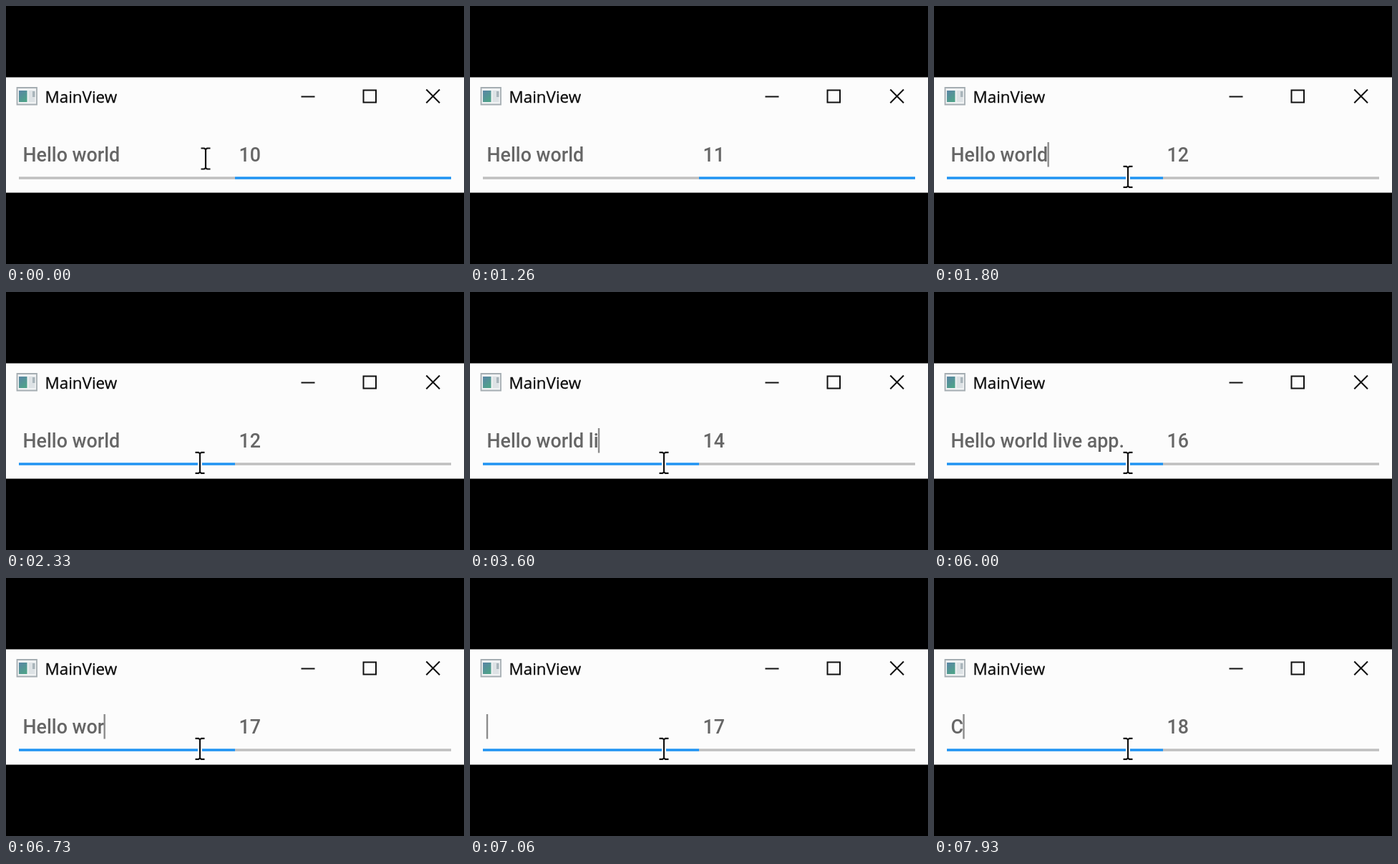
An HTML page for the animation above (8 s loop, 640 by 360 pixels).

```html
<!DOCTYPE html>
<html lang="en">
<head>
<meta charset="utf-8">
<title>MainView</title>
<style>
  html, body { margin: 0; width: 100%; height: 100%; overflow: hidden; background: #000; }
  svg { display: block; width: 100vw; height: 100vh; }
  text { white-space: pre; }
  .soft { filter: blur(.5px); }
  .title { font: 22.4px "Open Sans", "Noto Sans", sans-serif; fill: #0c0c0c; stroke: #0c0c0c; stroke-width: .3; }
  .field { font: 500 26.8px Roboto, sans-serif; fill: #666; }
  .line { stroke: #bfbfbf; stroke-width: 3.6; }
  .line.focus { stroke: #1f93f2; }
  .buttons { fill: none; stroke: #111; stroke-width: 2; }
</style>
</head>
<body>
<svg viewBox="0 0 640 360">
  <defs>
    <clipPath id="frame"><path d="M0 99.5H640V260.5H0z"/></clipPath>
    <linearGradient id="teal" x2="0.6" y2="1">
      <stop stop-color="#5a84a6"/><stop offset="1" stop-color="#4fa28a"/>
    </linearGradient>
    <path id="beam" d="M-6.5 -14.5H-2L0 -13L2 -14.5H6.5M0 -13V13M-6.5 14.5H-2L0 13L2 14.5H6.5"/>
  </defs>
  <g clip-path="url(#frame)">
    <path d="M0 99H640V261H0z" fill="#fcfcfc"/>

    <g class="soft">
      <g>
        <path d="M15.5 114H43V137.5H15.5z" fill="#f1f3f4" stroke="#a5adb2" stroke-width="1.8"/>
        <path d="M18 118H29.5V134H18z" fill="url(#teal)"/>
        <path d="M31.5 118H40.5V134H31.5z" fill="#dde2e5"/>
        <path d="M37 119H40.5V127H37z" fill="#a9b5bb"/>
      </g>
      <text class="title" x="54.5" y="135.2">MainView</text>
      <g class="buttons">
        <path d="M412.5 126.5H431.5M499.5 117.5H517V134.5H499.5z"/>
        <path d="M587.3 116.5L606 135.2M606 116.5L587.3 135.2"/>
      </g>

      <text class="field" id="words" x="23.5" y="217"></text>
      <text class="field" id="count" x="325.5" y="217"></text>
      <path class="line" id="left" d="M18 240H320"/>
      <path class="line" id="right" d="M320 240H622"/>
      <path id="caret" d="M22.8 190V224.5H25.2V190z" fill="#8c8c8c"/>

      <g id="pointer" fill="none">
        <use href="#beam" stroke="#fff" stroke-width="6"/>
        <use href="#beam" stroke="#111" stroke-width="2.2"/>
      </g>
    </g>
  </g>
</svg>
<script>
const $ = id => document.getElementById(id);
const LOOP = 8000, CLICK = 1750;
const START = "Hello world", FULL = START + " live app.";

// Each edit is [time, text]; the caret blink restarts with every edit.
const edits = [[CLICK, START]];
[2850, 3200, 3480, 3800, 4050, 4350, 4600, 4820, 5000, 5350]
  .forEach((time, i) => edits.push([time, FULL.slice(0, START.length + i + 1)]));
for (let i = 1; i <= FULL.length; i++)
  edits.push([i === 1 ? 6150 : 6340 + i * 32, FULL.slice(0, -i)]);
edits.push([7700, "C"]);

// Pointer stops: time, x, y
const path = [
  [0, 279, 213], [400, 279, 213], [600, 281, 285],
  [1400, 272, 285], [1700, 271, 238.3], [LOOP, 271, 238.3]
];

function pointerAt(t) {
  const i = path.findIndex(stop => stop[0] > t);
  const [t0, x0, y0] = path[i - 1], [t1, x1, y1] = path[i];
  const p = (t - t0) / (t1 - t0), k = p * p * (3 - 2 * p);
  return `translate(${x0 + (x1 - x0) * k} ${y0 + (y1 - y0) * k})`;
}

function draw(now) {
  const t = now % LOOP, focused = t >= CLICK;
  const [since, text] = edits.findLast(e => e[0] <= t) || [0, START];
  $("words").textContent = text;
  $("count").textContent = 10 + Math.floor((t + 500) / 1000);
  $("left").classList.toggle("focus", focused);
  $("right").classList.toggle("focus", !focused);

  const lit = focused && (t - since) % 1000 < 500;
  $("caret").style.visibility = lit ? "visible" : "hidden";
  const width = text ? $("words").getComputedTextLength() : 0;
  $("caret").setAttribute("transform", `translate(${width} 0)`);
  $("pointer").setAttribute("transform", pointerAt(t));
  requestAnimationFrame(() => draw(performance.now() - begin));
}

const begin = performance.now();
draw(0);
</script>
</body>
</html>
```
